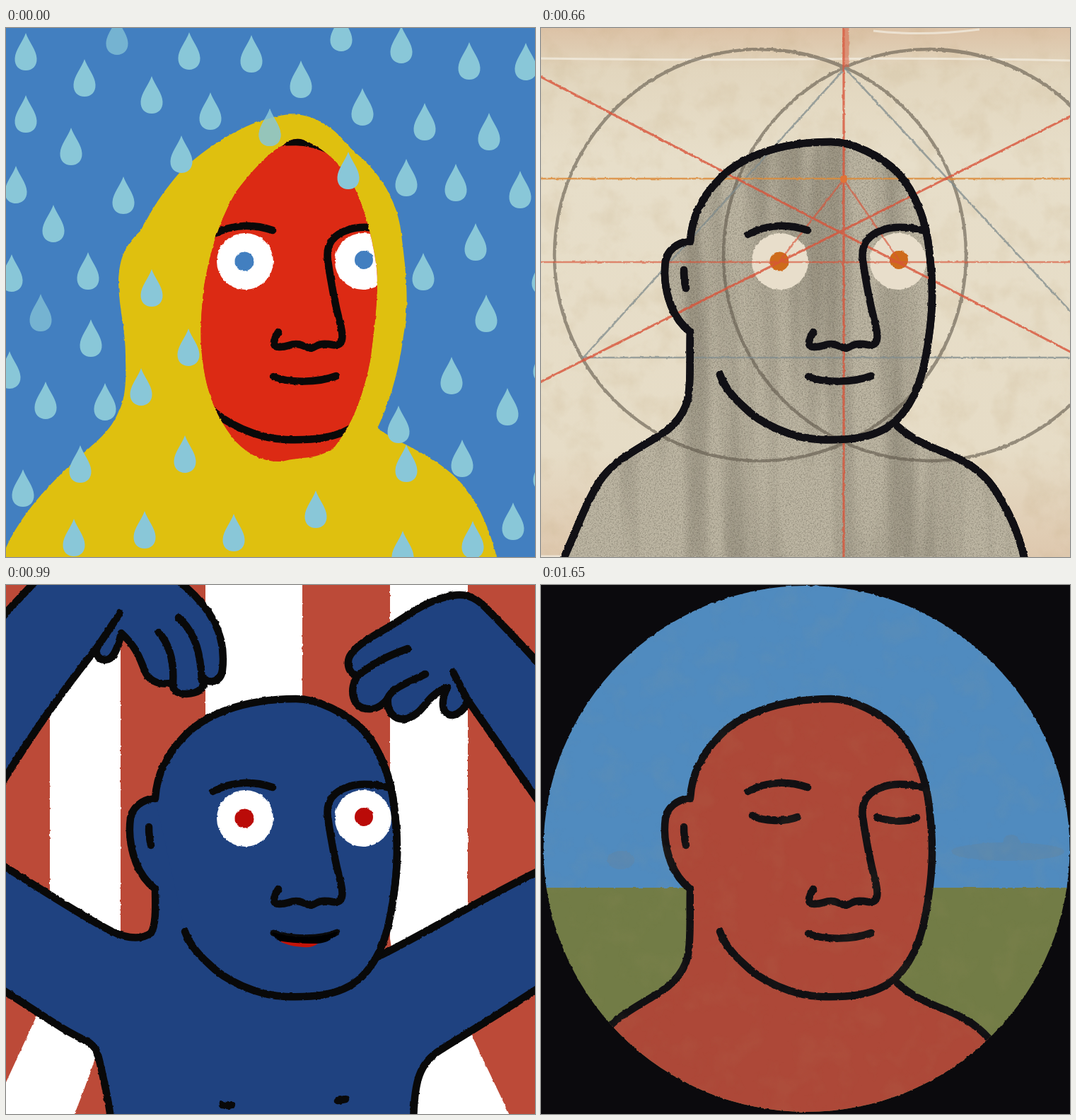
Recreate the animation shown at these times as an HTML page without scripts. Size 748 by 748 pixels, loop 1.98 s.

```html
<!DOCTYPE html>
<html lang="en">
<head>
<meta charset="utf-8">
<title>Six faces</title>
<style>
html, body { margin: 0; width: 100%; height: 100%; overflow: hidden; background: #0b0a0d; }
.scene {
  position: absolute; left: 0; top: 0; width: 100%; height: 100%;
  opacity: 0; will-change: opacity;
  animation: show 1.98s step-end infinite;
  animation-delay: calc((var(--i) - 6) * .33s);
}
@keyframes show { 0% { opacity: 1 } 16.6667% { opacity: 0 } }
.line { fill: none; stroke: var(--ink, #090909); stroke-width: 10.5; stroke-linecap: round; stroke-linejoin: round; }
.skin { fill: var(--skin); }
.eye { fill: var(--eye, #fff); }
.iris { fill: var(--iris); }
.rough { filter: url(#rough); }
.gold { fill: none; stroke: #c19f17; stroke-width: 13; stroke-linejoin: round; }
.guide { fill: none; stroke-width: 2.6; }
</style>
</head>
<body>

<!-- rain -->
<svg class="scene" style="--i:0;--skin:#dc2a14;--iris:#427fc0" viewBox="0 0 748 748">
  <defs>
    <filter id="rough" filterUnits="userSpaceOnUse" x="-12" y="-12" width="772" height="772" color-interpolation-filters="sRGB">
      <feTurbulence type="fractalNoise" baseFrequency=".16" numOctaves="2" seed="4"/>
      <feDisplacementMap in="SourceGraphic" scale="2.8" xChannelSelector="R" yChannelSelector="G"/>
    </filter>
    <filter id="grain" filterUnits="userSpaceOnUse" x="0" y="0" width="748" height="748" color-interpolation-filters="sRGB">
      <feTurbulence type="fractalNoise" baseFrequency=".55" numOctaves="2" seed="9"/>
      <feColorMatrix values="0 0 0 0 .2  0 0 0 0 .18  0 0 0 0 .14  3 0 0 0 -1.3"/>
    </filter>
    <filter id="streak" filterUnits="userSpaceOnUse" x="0" y="0" width="748" height="748" color-interpolation-filters="sRGB">
      <feTurbulence type="fractalNoise" baseFrequency=".025 .002" numOctaves="2" seed="5"/>
      <feColorMatrix values="0 0 0 0 .35  0 0 0 0 .33  0 0 0 0 .28  3 0 0 0 -1.2"/>
    </filter>
    <filter id="wear" filterUnits="userSpaceOnUse" x="0" y="0" width="748" height="748" color-interpolation-filters="sRGB">
      <feTurbulence type="fractalNoise" baseFrequency=".025" numOctaves="4" seed="3"/>
      <feColorMatrix values="0 0 0 0 .75  0 0 0 0 .65  0 0 0 0 .48  3 0 0 0 -1.4"/>
    </filter>

    <path id="head" class="line" style="fill:var(--skin)" d="M211 302C213 268 226 240 252 214C280 184 335 161 410 161C440 161 480 180 505 205C530 233 545 275 549 315C555 365 554 400 548 440C541 490 530 530 499 558C470 582 430 583 395 582C355 580 310 560 286 535C268 519 257 502 253 490"/>
    <path id="torso" class="line" style="fill:var(--skin)" d="M211 301C190 304 178 316 176 330C173 352 177 375 184 393C191 411 201 422 211 430C210 455 212 490 209 515C206 550 180 570 158 582C125 602 100 615 82 642C62 675 50 710 33 748L-150 1200H850L683 748C675 712 660 680 640 650C622 625 600 612 570 600C545 590 520 580 499 558"/>
    <path id="lug" class="line" d="M202 342C202 355 203 360 205 368"/>
    <g id="eyes">
      <circle class="eye" cx="338" cy="330" r="40"/>
      <circle class="eye" cx="505" cy="330" r="40"/>
      <circle class="iris" cx="337" cy="330" r="13.5"/>
      <circle class="iris" cx="506" cy="328" r="13"/>
    </g>
    <path id="nose" class="line" d="M293 292C320 277 350 277 377 286M543 287C520 281 500 280 485 285C463 292 452 305 455 328C458 350 465 390 473 420C478 440 476 450 462 448C447 445 440 448 434 452C427 455 422 447 410 447C400 447 397 452 385 451C375 450 379 440 385 430"/>
    <path id="mouth" class="line" d="M378 493C400 502 440 502 467 492"/>
    <path id="rim" class="line" d="M505 205C530 233 545 275 549 315C555 365 554 400 548 440"/>
    <g id="bald">
      <use href="#torso"/><use href="#head"/><use href="#lug"/>
    </g>
    <g id="man">
      <use href="#bald"/><use href="#eyes"/><use href="#rim"/><use href="#nose"/>
    </g>
    <g id="smiler"><use href="#man"/><use href="#mouth"/></g>

    <marker id="drop" markerUnits="userSpaceOnUse" markerWidth="40" markerHeight="60" overflow="visible">
      <path fill="#89c7d8" d="M0-26C4-14 15-2 15.500 10C16 21 9 27 0 27S-16 21-15.500 10C-15-2-4-14 0-26Z"/>
    </marker>
    <path id="opening" d="M392 166C375 172 345 205 325 232C300 275 288 320 280 365C275 410 274 440 278 470C284 520 300 555 325 585C345 605 365 614 390 613C420 605 440 612 465 592C490 560 505 520 515 470C522 420 527 370 524 340C518 290 500 230 480 205C465 185 445 168 420 158C410 155 400 158 392 166Z"/>
    <clipPath id="face"><use href="#opening"/></clipPath>
  </defs>
  <rect width="748" height="748" fill="#427fc0"/>
  <g class="rough">
    <path fill="#dfc00f" d="M-10 755L0 735C20 690 60 645 100 610C120 590 145 575 158 545C170 525 170 490 169 470C170 430 160 400 159 360C160 330 165 310 190 287C205 260 215 240 245 205C285 165 340 135 372 128C395 120 420 120 440 130C465 143 475 155 490 173C525 200 555 240 560 300C569 370 568 400 562 435C555 490 540 535 525 566C560 590 610 605 645 645C670 675 685 710 697 760H-10Z"/>
    <use href="#opening" fill="#dc2a14"/>
    <g clip-path="url(#face)"><use href="#head"/><use href="#eyes"/><use href="#nose"/><use href="#mouth"/></g>
  </g>
  <path fill="none" style="marker:url(#drop)" d="M28 33L111 70L259 32L347 36L474 6L417 72L559 23L655 46L735 47L28 121L92 167L206 94L289 117L504 111L592 132L683 146L248 178L484 201L14 221L166 236L566 211L636 218L727 228L67 276L664 302L116 343L8 346L590 344L206 367L679 403L120 438L258 451L5 483L56 526L140 528L191 507L630 491L709 535L555 560L566 615L105 616L24 650L253 602L645 608L438 680L96 720L196 709L322 713L561 737L660 723L717 697L759 350L761 475L761 628"/>
  <path fill="none" style="marker:url(#drop)" opacity=".72" d="M157 11L49 402"/>
  <path fill="none" style="marker:url(#drop)" opacity=".85" d="M373 140V140"/>
</svg>

<!-- robe -->
<svg class="scene" style="--i:1;--skin:#c69a42;--ink:#14131a;--eye:#f2e7da;--iris:#14131a" viewBox="0 0 748 748">
  <clipPath id="moon"><circle cx="428" cy="243" r="40.500"/></clipPath>
  <rect width="748" height="748" fill="#163280"/>
  <rect width="748" height="45" fill="#152a63" opacity=".6"/>
  <g class="rough">
    <path fill="#15182a" stroke="#c19f17" stroke-width="12" d="M284-6C250 48 185 130 149 193C111 290 81 370 62 470C47 560 41 620 37 680L30 780H732C727 720 718 650 698 540C688 470 664 390 639 320C604 225 579 165 559 130C539 90 509 40 480-6"/>
    <path fill="#f2e7da" d="M376 54L288 183C240 260 200 360 185 415L153 560L580 573L551 457C530 370 490 250 443 162Z"/>
    <use href="#bald"/>
    <path fill="#1f3f7c" d="M20 760C40 690 70 620 150 575C180 560 198 540 199 500C207 552 238 578 273 604C313 630 345 665 367 706C375 685 390 660 420 635C450 610 490 580 519 543C530 565 560 578 575 582C630 600 660 640 680 680C695 705 705 735 713 760Z"/>
    <path class="gold" d="M20 760C40 690 70 620 150 573C180 560 198 540 199 496C207 552 238 578 273 604C313 630 345 665 366 706Q378 728 386 760M367 708C375 685 390 660 420 635C450 610 490 580 519 543C530 565 560 578 575 582C630 600 660 640 680 680C695 705 705 735 713 760M152 574C175 620 225 630 258 663C286 690 305 720 322 760M562 580C532 625 492 650 460 676C432 700 420 725 398 756"/>
    <path class="line" d="M549 315C555 365 554 400 548 440C541 490 530 530 499 558C470 582 430 583 395 582"/>
    <use href="#eyes"/><use href="#rim"/><use href="#nose"/><use href="#mouth"/>
    <g clip-path="url(#moon)">
      <rect x="380" y="200" width="100" height="90" fill="#1c3f8b"/>
      <circle cx="375" cy="205" r="72" fill="#1a2530"/>
      <circle cx="379" cy="207" r="36" fill="#e9e0cd"/>
    </g>
    <path fill="none" stroke="#d9dbd6" stroke-width="2.500" opacity=".5" d="M-10 43Q200 46 380 44T760 47M480 4Q560 8 620 6T680 6T760 2"/>
  </g>
  <rect width="748" height="748" filter="url(#wear)" opacity=".05"/>
</svg>

<!-- geometry -->
<svg class="scene" style="--i:2;--skin:#bdb6a3;--ink:#111015;--eye:#e8decb;--iris:#ce6b1b" viewBox="0 0 748 748">
  <linearGradient id="paper" x2="0" y2="1">
    <stop stop-color="#dcc2a6"/><stop offset=".08" stop-color="#e2d6be"/>
    <stop offset=".25" stop-color="#e7dec9"/><stop offset=".8" stop-color="#e6dcc6"/><stop offset="1" stop-color="#dec8ae"/>
  </linearGradient>
  <clipPath id="flesh"><use href="#torso"/><use href="#head"/></clipPath>
  <rect width="748" height="748" fill="url(#paper)"/>
  <rect width="748" height="748" filter="url(#wear)" opacity=".15"/>
  <path fill="none" stroke="#f4efe4" stroke-width="3" opacity=".7" d="M0 43Q200 46 380 44T748 46M470 4Q540 12 620 2M0 747H130"/>
  <g class="rough">
    <use href="#bald"/>
    <g clip-path="url(#flesh)">
      <rect width="748" height="748" filter="url(#streak)" opacity=".3"/>
      <rect width="748" height="748" filter="url(#grain)" opacity=".25"/>
    </g>
    <use href="#eyes"/>
    <g class="guide" stroke="#5f574a" opacity=".6" style="stroke-width:4.500">
      <circle cx="310" cy="321" r="291"/><circle cx="549" cy="321" r="291"/>
      <path d="M310 30Q375 32 429 56M549 30Q620 32 680 61"/>
    </g>
    <path class="guide" stroke="#7f8b8d" opacity=".75" d="M760 413L430 57L60 466H760"/>
    <path class="guide" stroke="#dc8c3c" opacity=".85" d="M-10 213H760"/>
    <g class="guide" stroke="#d9543a" opacity=".8">
      <path style="stroke-width:3.200" d="M428-10V760M-10 64L760 464M-10 505L760 119"/>
      <path opacity=".8" d="M-10 331H760M337 330L428 214L506 328"/>
      <path style="stroke-width:9" opacity=".6" d="M431-10V55"/>
    </g>
    <circle cx="428" cy="214" r="5" fill="#e17336"/>
    <g style="--skin:none"><use href="#bald"/><use href="#nose"/><use href="#mouth"/></g>
  </g>
</svg>

<!-- stripes -->
<svg class="scene" style="--i:3;--skin:#1f4280;--iris:#ba0b08" viewBox="0 0 748 748">
  <rect width="748" height="748" fill="#fff"/>
  <g class="rough">
    <path fill="#bc4a38" d="M-10-10H62V440Q60 570 42 612L-10 725ZM162-10H282V760H92Q162 590 162 490ZM419-10H543V500L583 760H419ZM653-10H760V760H717L660 640Q653 540 653 455Z"/>
    <path class="line" style="fill:var(--skin)" d="M211 301C190 304 178 316 176 330C173 352 177 375 184 393C191 411 201 422 211 430C211 450 213 480 205 492C195 500 175 502 150 490C110 470 50 430-12 392V568C40 600 80 630 115 645C130 655 130 665 135 685C140 710 146 730 150 770H576C576 700 585 675 615 657C650 635 700 605 762 564V400C660 450 580 500 525 526"/>
    <use href="#head"/><use href="#lug"/><use href="#eyes"/><use href="#rim"/><use href="#nose"/>
    <path fill="#c31409" d="M384 502Q415 507 446 503Q435 514 420 512Q398 511 384 502Z"/>
    <path class="line" style="stroke-width:9" d="M378 492C400 500 445 502 468 491"/>
    <path d="M374 490Q420 505 470 490Q460 506 440 507Q400 507 383 502Z"/>
    <path class="line" d="M306 735Q314 737 319 735M469 729L480 727"/>
    <g class="line" style="fill:var(--skin)">
      <path d="M-12 52L45-9H240C290 30 312 70 306 120C304 138 287 139 281 133C280 150 270 153 255 154C240 154 235 148 236 138C220 142 205 138 198 125C190 108 187 90 163 68C158 90 152 106 140 106C130 105 125 97 129 88C80 150 40 205-12 290"/>
      <path d="M760 118C720 75 695 48 672 26C655 12 640 12 622 17C590 25 570 42 545 57C520 72 500 82 490 95C478 108 485 128 498 128C484 145 488 178 517 175C525 175 535 168 540 160C538 180 550 192 566 189C595 180 590 158 624 145C614 165 616 185 632 184C645 181 650 172 653 163L760 316"/>
    </g>
    <path class="line" d="M161 40L129 88M244 46C270 70 275 100 277 135M216 67C232 85 238 110 236 140M498 128C520 110 540 100 568 90M540 160C545 145 575 135 593 126M632 123L653 163"/>
  </g>
</svg>

<!-- crowd -->
<svg class="scene" style="--i:4" viewBox="0 0 748 748">
  <rect width="748" height="748" fill="#de7518"/>
  <g class="rough">
    <use href="#man" x="-327" y="-441" style="--skin:#65839a;--iris:#979660"/>
    <use href="#man" x="258" y="-408" style="--skin:#a94a3a;--iris:#65839a"/>
    <use href="#smiler" x="-70" y="-279" style="--skin:#de7518;--iris:#f5b408"/>
    <use href="#smiler" x="-261" y="-154" style="--skin:#f5b408;--iris:#ce8780"/>
    <use href="#smiler" x="207" y="-177" style="--skin:#65839a;--iris:#979660"/>
    <use href="#smiler" x="-320" y="134" style="--skin:#a94a3a;--iris:#65839a"/>
    <use href="#smiler" x="225" y="153" style="--skin:#ce8780;--iris:#de7518;--eye:#fffdf0"/>
    <use href="#man" style="--skin:#979660;--iris:#b24a3a"/>
    <path fill="#9e4740" d="M375 502C380 485 400 481 420 482C445 484 458 495 456 512C453 530 440 538 425 537C400 535 370 522 375 502Z"/>
    <path fill="#b93528" d="M375 502C395 490 435 508 440 533Q435 538 425 537C400 535 370 522 375 502Z"/>
  </g>
</svg>

<!-- calm -->
<svg class="scene" style="--i:5;--skin:#ad4838;--ink:#111013" viewBox="0 0 748 748">
  <clipPath id="port"><circle cx="375.500" cy="373" r="372"/></clipPath>
  <rect width="748" height="748" fill="#0b0a0d"/>
  <g class="rough">
    <g clip-path="url(#port)">
      <rect width="748" height="430" fill="#508bbf"/>
      <rect y="428" width="748" height="330" fill="#727c46"/>
      <g fill="#6b8294" opacity=".3">
        <ellipse cx="113" cy="389" rx="19" ry="13"/><ellipse cx="660" cy="377" rx="80" ry="13"/><circle cx="665" cy="366" r="13"/>
      </g>
      <use href="#bald"/><use href="#nose"/><use href="#mouth"/>
      <path class="line" d="M299 326C315 335 345 335 363 328M475 328C495 336 520 335 531 329"/>
      <rect width="748" height="748" filter="url(#wear)" opacity=".06"/>
    </g>
  </g>
</svg>

</body>
</html>
```
